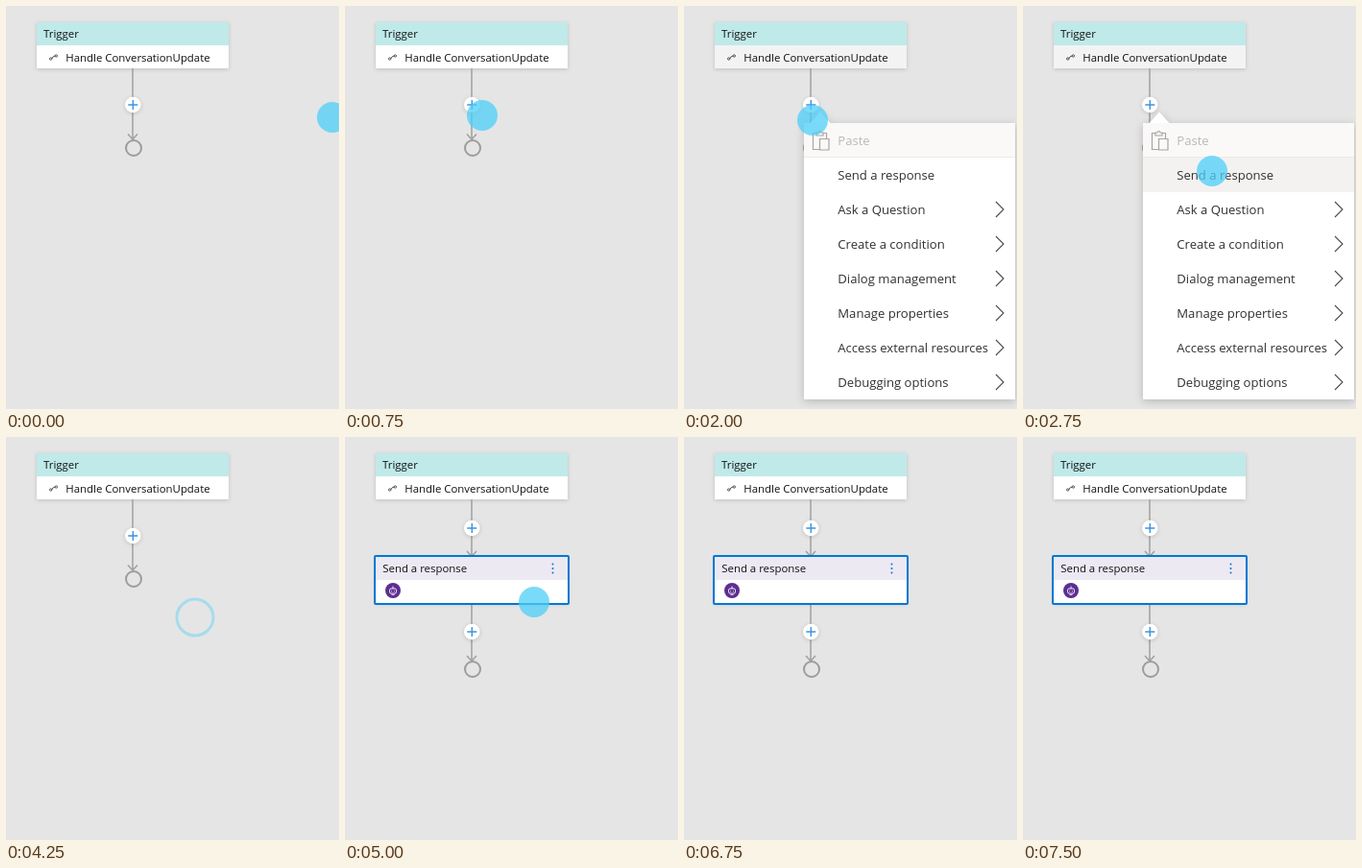
Recreate the animation shown at these times as an HTML page. Size 347 by 420 pixels, loop 7750 ms.

```html
<!DOCTYPE html>
<html lang="en">
<head>
<meta charset="utf-8">
<title>Add a response</title>
<style>
  html, body { margin: 0; width: 100%; height: 100%; overflow: hidden; background: #e5e5e5; }
  svg { display: block; width: 347px; height: 420px; }
  text { font: 11.4px "Open Sans", "Noto Sans", sans-serif; fill: #111; }
  #menu text { font-size: 13.1px; fill: #323130; }
  #menu .disabled { fill: #bbb9b7; }
  .card { filter: drop-shadow(0 1px 2px rgba(0, 0, 0, .16)); }
  #menu .panel { filter: drop-shadow(0 2px 4px rgba(0, 0, 0, .2)); }
  .wire { fill: none; stroke: #a0a0a0; stroke-width: 1.5; }
  .plus { fill: none; stroke: #3f93e0; stroke-width: 1.4; }
</style>
</head>
<body>
<svg viewBox="0 0 347 420">
  <g class="card">
    <rect x="32" y="17" width="200" height="48" fill="#fff" id="triggerBody"/>
    <rect x="32" y="17" width="200" height="24" fill="#bfeae9"/>
  </g>
  <text x="39" y="33">Trigger</text>
  <text x="62.3" y="58">Handle ConversationUpdate</text>
  <path d="M47.8 54.8 Q49 52 51.2 52" fill="none" stroke="#444"/>
  <g fill="none" stroke="#444" stroke-width=".9">
    <circle cx="46.7" cy="55" r="1.2"/><circle cx="52.3" cy="52" r="1.2"/>
  </g>

  <g id="before"></g>
  <g id="after">
    <g class="card">
      <rect x="32" y="125" width="200" height="48" fill="#fff"/>
      <rect x="32" y="125" width="200" height="24" fill="#ece9f2"/>
    </g>
    <text x="39.3" y="141">Send a response</text>
    <g fill="#0078d4">
      <circle cx="216.5" cy="132.5" r="1"/><circle cx="216.5" cy="137" r="1"/><circle cx="216.5" cy="141.5" r="1"/>
    </g>
    <circle cx="50" cy="160" r="8" fill="#5c2e91"/>
    <g fill="none" stroke="#fff" stroke-width=".9">
      <rect x="46.5" y="158" width="7" height="5" rx="1.5"/>
      <path d="M50 158V155.5M48.6 160.2v1M51.4 160.2v1M48.5 164.4h3"/>
    </g>
    <rect id="selection" x="31" y="124" width="202" height="50" rx="1" fill="none" stroke="#0078d4" stroke-width="2"/>
  </g>

  <g id="menu">
    <g class="panel" fill="#fff">
      <path d="M131 122.5L142 110.5L153 122.5Z"/>
      <rect x="125" y="122" width="220" height="288"/>
    </g>
    <rect x="125" y="122" width="220" height="36" fill="#faf9f8"/>
    <path d="M125 157.5H345" stroke="#edebe9"/>
    <rect id="hover" x="125" y="158" width="220" height="36" fill="#f3f2f1"/>
    <g fill="#faf9f8" stroke="#a8a6a4" stroke-width="1.2">
      <path d="M134.5 132.5H148.5V149.5H134.5Z"/>
      <path d="M138 135V132H140Q141.500 128.500 143 132H145V135Z"/>
      <path d="M141.500 138.500H151V150H141.500Z"/>
    </g>
    <g id="items"></g>
  </g>

  <circle id="ring" fill="none" stroke="#4ccff7"/>
  <circle id="cursor" r="16" fill="#4ccff7" fill-opacity=".75"/>
</svg>
<script>
const $ = id => document.getElementById(id);
const show = (el, on) => { el.style.display = on ? '' : 'none'; };
const set = (el, attrs) => { for (const k in attrs) el.setAttribute(k, attrs[k]); };

// Connector from y0 to y1 with an arrow head and an add button
const connector = (y0, y1, plusY) => `
  <path class="wire" d="M132 ${y0}V${y1}M127 ${y1 - 5.5}L132 ${y1}L137 ${y1 - 5.5}"/>
  <circle class="card" cx="132.300" cy="${plusY}" r="8.3" fill="#fff"/>
  <path class="plus" d="M127.300 ${plusY}h10M132.300 ${plusY - 5}v10"/>`;
const endpoint = y => `<circle cx="133" cy="${y}" r="8" fill="none" stroke="#9c9c9c" stroke-width="2"/>`;

$('before').innerHTML = connector(65, 139, 103) + endpoint(148);
$('after').insertAdjacentHTML('afterbegin',
  connector(65, 124.5, 95) + connector(174, 233.5, 203) + endpoint(242));

const labels = ['Paste', 'Send a response', 'Ask a Question', 'Create a condition',
  'Dialog management', 'Manage properties', 'Access external resources', 'Debugging options'];
$('items').innerHTML = labels.map((label, i) => {
  const y = 140 + 36 * i;
  const chevron = `<path d="M325 ${y - 8}L333 ${y}L325 ${y + 8}" fill="none" stroke="#4a4a4a" stroke-width="1.1"/>`;
  return `<text x="160.300" y="${y + 5}"${i ? '' : ' class="disabled"'}>${label}</text>${i > 1 ? chevron : ''}`;
}).join('');

const LOOP = 7750, STEP = 250;

// Cursor stops: [start ms, x, y]; without a position it is hidden
const stops = [
  [0, 340, 116], [250, 223, 152], [500, 197, 152], [750, 143, 114], [1000],
  [2000, 134, 119], [2250, 158, 143], [2500, 187, 164], [2750, 197, 172], [4250],
  [5000, 197, 172], [5500, 227, 214], [5750, 252, 221], [6500, 260, 221], [6750]
];

// Click ripples: the ring widens, thins and fades
const ripples = [
  { x: 134, y: 116, start: 1000, peak: 1500, end: 2000, alpha: .62, width: 3.5 },
  { x: 197, y: 188, start: 4250, peak: 4250, end: 5000, alpha: .42, width: 3 }
];

function drawRipple(t) {
  const r = ripples.find(p => t >= p.start && t < p.end);
  show($('ring'), r);
  if (!r) return;
  const early = Math.max(0, (r.peak - t) / 500);
  const late = Math.max(0, (t - r.peak) / (r.end - r.peak));
  set($('ring'), {
    cx: r.x, cy: r.y,
    r: 19 - early + 3 * late,
    'stroke-width': r.width + 4 * early - (r.width - .5) * late,
    'stroke-opacity': r.alpha * (1 - late) + .1 * early
  });
}

function draw(now) {
  const t = Math.floor(now % LOOP / STEP) * STEP;

  const [, x, y] = stops.filter(s => s[0] <= t).pop();
  show($('cursor'), x !== undefined);
  if (x !== undefined) set($('cursor'), { cx: x, cy: y });
  drawRipple(t);

  const menuOpen = t >= 1500 && t < 4250;
  const opening = Math.min(1, .6 + .3 * (t - 1500) / STEP);
  show($('menu'), menuOpen);
  if (menuOpen) set($('menu'), { opacity: opening, transform: `translate(0 ${-10 * (1 - opening)})` });
  show($('hover'), t >= 2500);
  set($('triggerBody'), { fill: menuOpen ? '#f3f3f3' : '#fff' });

  show($('before'), t < 4500);
  show($('after'), t >= 4500);
  show($('selection'), t >= 4750);
}

const origin = performance.now();
function tick() {
  draw(performance.now() - origin);
  requestAnimationFrame(tick);
}
tick();
</script>
</body>
</html>
```
